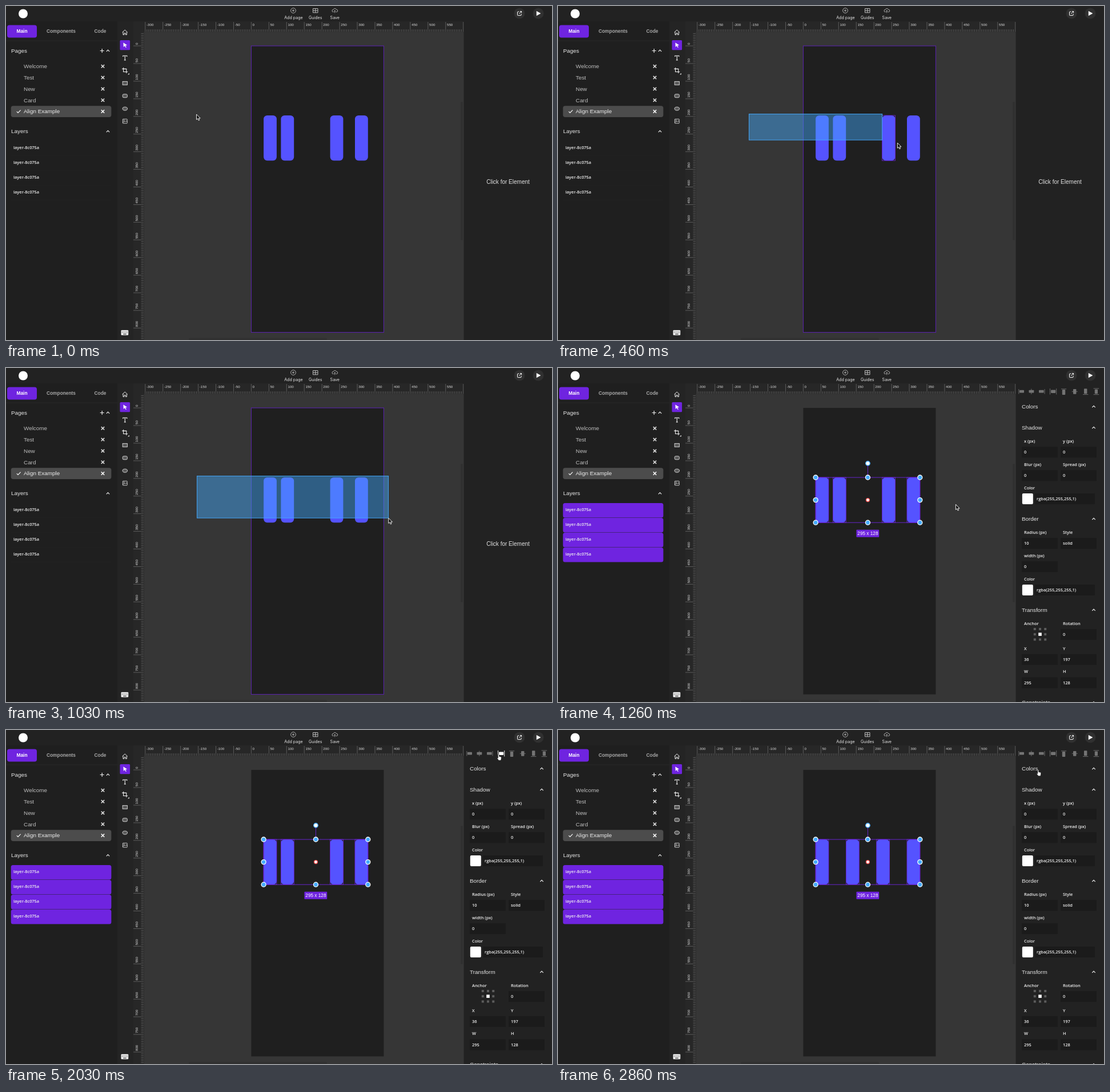
An HTML page for the animation above (2.89 s loop, 956 px wide and 586 px high).

```html
<!DOCTYPE html>
<html lang="en">
<head>
<meta charset="utf-8">
<title>Align demo</title>
<style>
html, body { margin: 0; width: 100%; height: 100%; overflow: hidden; background: #222; }
svg { display: block; }
text { font-family: "Liberation Sans", Arial, sans-serif; white-space: pre; }
.label { font-family: "Open Sans", "Noto Sans", sans-serif; font-weight: 600; }
.menu { font-family: Inter, sans-serif; }
</style>
</head>
<body>
<svg id="stage" width="956" height="586" viewBox="0 0 956 586"></svg>
<script>
const LOOP = 2890;
const PURPLE = '#6f24e0', EDGE = '#5d22b4', BLUE = '#44aaff';
const UNIT = 0.6188, LEFT = 429.4, TOP = 70;
const BAR_Y = 192, BAR_W = 22.8, BAR_H = 79.2;
const LOOSE = [451.1, 481.4, 567.6, 611];
const EVEN = [451.1, 504.4, 557.7, 611];

const stage = document.getElementById('stage');

function add(parent, tag, attrs, content) {
  const el = document.createElementNS('http://www.w3.org/2000/svg', tag);
  for (const key in attrs) el.setAttribute(key, attrs[key]);
  if (content !== undefined) el.textContent = content;
  return parent.appendChild(el);
}
const group = (parent = stage, attrs = {}) => add(parent, 'g', attrs);
const rect = (p, x, y, width, height, fill, more) =>
  add(p, 'rect', { x, y, width, height, fill, ...more });
const circle = (p, cx, cy, r, fill, more) => add(p, 'circle', { cx, cy, r, fill, ...more });
const line = (p, d, stroke = '#fff', width = 1, more) =>
  add(p, 'path', { d, fill: 'none', stroke, 'stroke-width': width, ...more });
const shape = (p, d, fill = '#fff', more) => add(p, 'path', { d, fill, ...more });
// y is the middle of the capitals
const text = (p, x, y, str, size, fill = '#e6e6e6', more) =>
  add(p, 'text', { x, y: y + size * 0.355, 'font-size': size, fill, ...more }, str);
const label = (p, x, y, str) => text(p, x, y, str, 7.43, '#f0f0f0', { class: 'label' });
const chevron = (p, x, y) => line(p, `M${x - 2.7},${y + 1.4}l2.7,-2.8l2.7,2.8`, '#eee', 1.2);
const show = (el, on) => el.setAttribute('visibility', on ? 'visible' : 'hidden');
const MID = { 'text-anchor': 'middle' };

function drawCanvas() {
  rect(stage, 0, 0, 956, 586, '#222');
  rect(stage, 241, 45, 560.5, 541, '#363636');
  rect(stage, 796, 168, 4, 243, '#303030', { rx: 2 });
  rect(stage, 320, 582.5, 242, 3.5, '#303030', { rx: 1.7 });
  rect(stage, LEFT, TOP, 232, 502.6, '#1f1f1f');
}

function drawRulers() {
  const g = group();
  rect(g, 222, 27, 579.5, 18.5, '#272727');
  rect(g, 222, 27, 19.5, 559, '#272727');
  let minor = '', major = '';
  for (let u = -300; u <= 600; u += 5) {
    const x = (LEFT + u * UNIT).toFixed(2);
    if (u % 50) minor += `M${x},41V45.3`;
    else {
      major += `M${x},28V45.3`;
      if (u < 600) text(g, +x + 2.2, 33.2, u, 6.2, '#ddd');
    }
  }
  for (let u = -35; u <= 830; u += 5) {
    const y = (TOP + u * UNIT).toFixed(2);
    if (u % 50) minor += `M236.5,${y}H241`;
    else {
      major += `M223,${y}H241`;
      text(g, 0, 0, u, 6.2, '#ddd', { transform: `translate(228.6 ${y - 2}) rotate(-90)` });
    }
  }
  line(g, minor, '#777', 0.65);
  line(g, major, '#777', 0.65);
}

function drawHeader() {
  rect(stage, 0, 0, 956, 27, '#222');
  circle(stage, 30, 13.5, 8, '#fff');
  [[503.4, 'Add page'], [541.7, 'Guides'], [575.8, 'Save']].forEach(([x, s]) =>
    text(stage, x, 20.2, s, 7.1, '#e8e8e8', { class: 'menu', ...MID }));
  circle(stage, 503, 8, 4.4, 'none', { stroke: '#ccc', 'stroke-width': 0.8 });
  line(stage, 'M501,8h4M503,6v4', '#ccc', 0.8);
  line(stage, 'M537.5,4.5h8.5v7.2h-8.5zM541.75,4.5v7.2M537.5,8.1h8.5', '#ccc', 0.9);
  line(stage, 'M573.7,10.5h-.6a2.1,2.1 0 0 1 0,-4.2a3,3 0 0 1 5.5,0a2.1,2.1 0 0 1 0,4.2h-.9M575.7,12.2v-4.3M574.2,9.3l1.5,-1.5l1.5,1.5', '#ccc', 0.8);
  circle(stage, 899, 13, 9.5, '#303030');
  circle(stage, 932, 13, 9.5, '#303030');
  line(stage, 'M898.5,10h-2.2q-.8,0 -.8,.8v5q0,.8 .8,.8h5q.8,0 .8,-.8v-2.3M900,9.4h2.6v2.6M898.2,13.8l4.2,-4.2', '#fff', 1);
  shape(stage, 'M928.8,8.8L936.4,13L928.8,17.2Z');
}

function drawSidebar() {
  rect(stage, 0, 27, 195, 559, '#1f1f1f');
  rect(stage, 0, 60.5, 195, 0.8, '#2b2b2b');
  rect(stage, 2, 33.5, 52, 22, PURPLE, { rx: 4 });
  [[28, 'Main', '#fff'], [96.5, 'Components', '#a6a6a6'], [165, 'Code', '#a6a6a6']].forEach(([x, s, c]) =>
    text(stage, x, 44.3, s, 8.35, c, { 'font-weight': 700, ...MID }));
  text(stage, 9, 78.4, 'Pages', 9.9);
  line(stage, 'M164.7,78.5h7M168.2,75v7', '#eee', 1.2);
  chevron(stage, 178.5, 78.5);
  rect(stage, 8.7, 175.3, 175.7, 19.8, '#4c4c4c', { rx: 4 });
  ['Welcome', 'Test', 'New', 'Card', 'Align Example'].forEach((s, i) => {
    const y = 105.7 + i * 19.8;
    text(stage, 31, y, s, 9.9, i < 4 ? '#bdbdbd' : '#eee');
    line(stage, `M166.8,${y - 2.6}l5.4,5.4m0,-5.4l-5.4,5.4`, i < 4 ? '#ddd' : '#fff', 1.6);
  });
  line(stage, 'M18.8,185.2l2.2,2.3l4.6,-4.8', '#fff', 1.1);
  text(stage, 9, 219.8, 'Layers', 9.9);
  chevron(stage, 178.5, 220);

  const picked = group();
  for (let i = 0; i < 4; i++) {
    const y = 237 + i * 26;
    rect(stage, 9, y + 25.4, 175, 0.5, '#232323');
    rect(picked, 8.7, y, 175.7, 25.5, PURPLE, { rx: 3.5 });
  }
  stage.appendChild(picked);
  for (let i = 0; i < 4; i++) label(stage, 13, 248.3 + i * 26, 'layer-8c075a');
  return picked;
}

function drawTools() {
  rect(stage, 195, 27, 27.5, 559, '#242424');
  line(stage, 'M203.7,46.2l4.5,-4.2l4.5,4.2M205,45.5v4.9h2v-2.7h2.4v2.7h2v-4.9', '#eee', 1);
  rect(stage, 199.5, 60, 17.6, 17.2, PURPLE, { rx: 1.5 });
  shape(stage, 'M205.4,64.2l6.7,4.6l-2.9,.6l1.7,3l-1.3,.7l-1.6,-3l-2.2,2z');
  line(stage, 'M204.8,89v-1.8h7v1.8M208.3,87.2v7.6M206.8,94.9h3', '#eee', 1.1);
  line(stage, 'M205.6,108v7.5h7.6M203.2,110.4h7.6v7.5', '#eee', 1.1);
  shape(stage, 'M213.2,120.3h2.6v-2.6z');
  const box = { stroke: '#ddd', 'stroke-width': 0.9 };
  rect(stage, 204.2, 132.4, 8.2, 6, '#5a5a5a', box);
  rect(stage, 204.2, 154.7, 8.2, 6, '#5a5a5a', { ...box, rx: 2 });
  add(stage, 'ellipse', { cx: 208.3, cy: 180.2, rx: 4.2, ry: 3, fill: '#5a5a5a', ...box });
  rect(stage, 204.4, 198.4, 7.8, 7.4, 'none', { ...box, rx: 0.6 });
  line(stage, 'M204.6,204.6l2.3,-2.5l1.4,1.2l2,-2.1l1.8,2', '#ddd', 0.9);
  circle(stage, 206.7, 200.6, 0.9, '#ddd');
  rect(stage, 201.6, 568.8, 12.6, 8.8, '#fff', { rx: 1 });
  line(stage, 'M203,571.2h10M203,573.3h10', '#242424', 1.1, { 'stroke-dasharray': '1.1 1.1' });
  line(stage, 'M205.2,575.6h5.6', '#242424', 1.1);
}

function drawAligners(p) {
  const icons = [
    ['M806.8,37v8.5', 808, 38.8, 8, 4.8],
    ['M828.8,36.5v9.5', 824.5, 38.8, 8.8, 4.8],
    ['M852,37v8.5', 842, 38.8, 8.6, 4.8],
    ['M861.5,36v10.5M872.7,36v10.5', 863, 38.5, 8.2, 5.4],
    ['M881,36.8h9.2', 882.8, 38, 5.4, 9],
    ['M899.8,41.3h10', 902, 37, 5.4, 8.8],
    ['M919,46.5h9.4', 921, 36.2, 5.4, 9],
    ['M937.6,36h9.6M937.6,46.6h9.6', 939.8, 37.6, 5.2, 7.6]
  ];
  return icons.map(([d, x, y, w, h]) => {
    const g = group(p, { color: '#747474' });
    line(g, d, 'currentColor', 0.9);
    rect(g, x, y, w, h, 'currentColor', { rx: 0.8 });
    return g;
  })[3];
}

function drawPanel() {
  const p = group();
  const hoverIcon = drawAligners(p);
  const section = (y, name) => { text(p, 812, y, name, 9.9); chevron(p, 938, y + 0.3); };
  const field = (x, y, name, value) => {
    label(p, x, y, name);
    rect(p, x - 4, y + 10, 63, 19, '#1b1b1b');
    label(p, x, y + 19.5, value);
  };
  const color = y => {
    label(p, 816, y, 'Color');
    rect(p, 812.8, y + 10, 19, 19, '#fff', { rx: 2 });
    rect(p, 835, y + 10, 105, 19, '#1b1b1b');
    label(p, 838, y + 19.5, 'rgba(255,255,255,1)');
  };
  section(67.4, 'Colors');
  section(104.4, 'Shadow');
  field(816, 128.3, 'x (px)', '0');
  field(884, 128.3, 'y (px)', '0');
  field(816, 169.2, 'Blur (px)', '0');
  field(884, 169.2, 'Spread (px)', '0');
  color(210);
  section(264.4, 'Border');
  field(816, 288.2, 'Radius (px)', '10');
  field(884, 288.2, 'Style', 'solid');
  field(816, 329, 'width (px)', '0');
  color(370);
  section(424.2, 'Transform');
  label(p, 816, 448, 'Anchor');
  for (let i = 0; i < 9; i++) {
    const s = i === 4 ? 5.6 : 4;
    rect(p, 834.8 + (i % 3) * 9.2 - s / 2, 458 + Math.floor(i / 3) * 9.2 - s / 2, s, s, i === 4 ? '#fff' : '#5c5c5c');
  }
  field(884, 448, 'Rotation', '0');
  field(816, 492, 'X', '36');
  field(884, 492, 'Y', '197');
  field(816, 532.7, 'W', '295');
  field(884, 532.7, 'H', '128');
  section(586.6, 'Constraints');
  return { panel: p, hoverIcon };
}

function drawSelection() {
  const g = group();
  const [x0, x1, y0, y1] = [451.1, 633.8, 192, 271.2];
  const cx = (x0 + x1) / 2, cy = (y0 + y1) / 2;
  line(g, `M${x0},${y0}H${x1}V${y1}H${x0}ZM${cx},${y0}V167`, PURPLE, 0.9);
  for (const x of [x0, cx, x1])
    for (const y of [y0, cy, y1])
      if (x !== cx || y !== cy) circle(g, x, y, 4, BLUE, { stroke: '#fff', 'stroke-width': 1.3 });
  circle(g, cx, 167.3, 3.8, '#fff', { stroke: BLUE, 'stroke-width': 1.3 });
  circle(g, cx, cy, 3, '#fff', { stroke: '#f2504f', 'stroke-width': 1.3 });
  rect(g, 522.4, 283.8, 39.8, 13, PURPLE, { rx: 1 });
  text(g, cx, 290.4, '295 x 128', 8.25, '#fff', MID);
  return g;
}

drawCanvas();
drawRulers();
drawHeader();
const pickedLayers = drawSidebar();
drawTools();
const pageEdge = rect(stage, LEFT, TOP, 232, 502.6, 'none', { stroke: EDGE, 'stroke-width': 1 });
const bars = LOOSE.map(() => {
  const g = group();
  rect(g, 0, BAR_Y, BAR_W, BAR_H, '#5553ff', { rx: 6.2 });
  const edge = rect(g, 0, BAR_Y, BAR_W, BAR_H, 'none', { stroke: PURPLE, 'stroke-width': 0.8 });
  return { g, edge };
});
const selection = drawSelection();
rect(stage, 802, 27, 154, 559, '#222');
const hint = text(stage, 879, 308.2, 'Click for Element', 10, '#e2e2e2', MID);
const { panel, hoverIcon } = drawPanel();
const marquee = rect(stage, 334.5, 189.5, 0, 0, BLUE, { 'fill-opacity': 0.45, stroke: BLUE, 'stroke-width': 0.9 });
const arrow = shape(stage, 'M0,0V9.3L2.1,7.4L3.6,10.8L5.2,10.1L3.8,6.9H6.7Z', '#111', { stroke: '#fff', 'stroke-width': 0.9 });
const hand = shape(stage, 'M1.9,1.2q0,-1.1 .9,-1.1t.9,1.1V4l2.9,.6q1.2,.4 1.1,1.5L7.3,9.3L6.7,11H3L.4,7.5q-.4,-1 .5,-1.1l1,.6z', '#fff', { stroke: '#111', 'stroke-width': 0.6 });

// time, x, y of the pointer
const PATH = [
  [0, 333.5, 190], [50, 335, 190], [200, 425, 205], [330, 518, 224], [420, 567, 235],
  [460, 594, 240], [530, 617, 247], [650, 652.5, 257.5], [690, 658, 259], [850, 669, 263],
  [1090, 670, 263.3], [1250, 692, 244], [1400, 752, 180], [1550, 822, 110], [1650, 847, 86],
  [1730, 854.5, 77], [1850, 856.5, 62], [2000, 859.5, 44], [2100, 860, 38.7],
  [2670, 860, 38.7], [2740, 853, 50], [2860, 838, 69.7], [2890, 837.5, 70]
];
function pointerAt(t) {
  const i = Math.max(1, PATH.findIndex(k => k[0] >= t));
  const [a, b] = [PATH[i - 1], PATH[i]];
  const f = Math.max(0, (t - a[0]) / (b[0] - a[0]));
  return [a[1] + (b[1] - a[1]) * f, a[2] + (b[2] - a[2]) * f];
}

const LAG = 40, RELEASE = 1060, ALIGN = 2230;

function render(t) {
  const [x, y] = pointerAt(t);
  const [mx, my] = pointerAt(Math.max(0, t - LAG));
  const picked = t >= RELEASE;

  show(marquee, !picked && mx > 335.5);
  marquee.setAttribute('width', Math.max(0, mx - 334.5));
  marquee.setAttribute('height', Math.max(0, my - 189.5));

  [pickedLayers, selection, panel].forEach(el => show(el, picked));
  [pageEdge, hint].forEach(el => show(el, !picked));
  bars.forEach(({ g, edge }, i) => {
    const bx = (t < ALIGN ? LOOSE : EVEN)[i];
    g.setAttribute('transform', `translate(${bx} 0)`);
    show(edge, picked || (mx > bx - 1 && mx < bx + BAR_W));
  });
  hoverIcon.setAttribute('color', picked && x > 858 && y < 46 ? '#fff' : '#747474');

  const inPanel = picked && x > 802;
  show(arrow, !inPanel);
  show(hand, inPanel);
  (inPanel ? hand : arrow).setAttribute('transform', `translate(${x} ${y})`);
}

const start = performance.now();
function tick() {
  render((performance.now() - start) % LOOP);
  requestAnimationFrame(tick);
}
tick();
</script>
</body>
</html>
```
